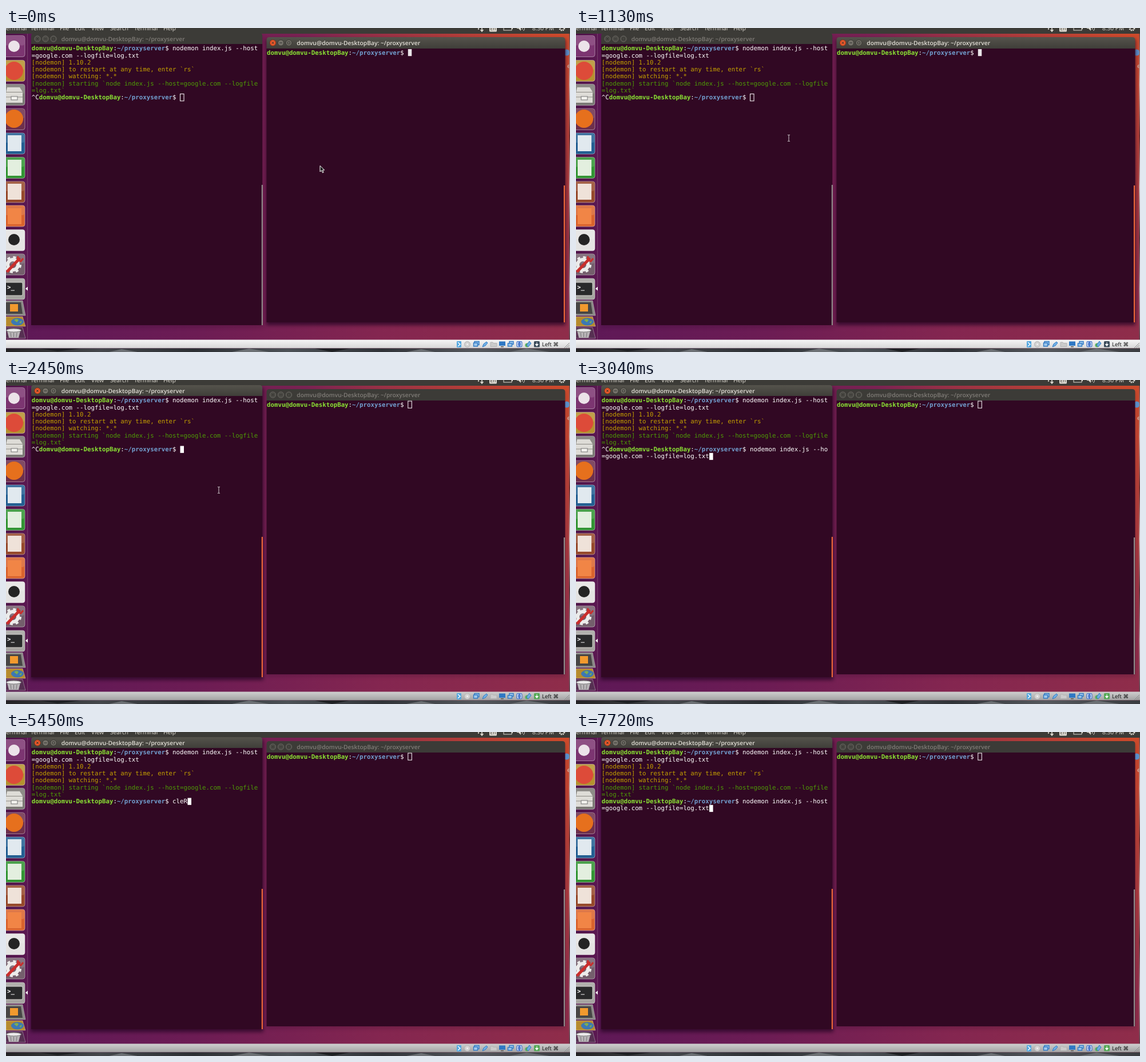
An HTML page for the animation above (8 s loop, 986x568 px).

```html
<!DOCTYPE html>
<html lang="en">
<head>
<meta charset="utf-8">
<title>Terminal session</title>
<style>
html, body { margin: 0; width: 100%; height: 100%; overflow: hidden; background: #333; }
svg { display: block; width: 986px; height: 568px; }
text { white-space: pre; text-rendering: geometricPrecision; font-family: "Open Sans", "DejaVu Sans", sans-serif; }
.mono { font: 10.78px "DejaVu Sans Mono", monospace; fill: #fff; }
.mono .user { fill: #8ae234; font-weight: bold; }
.mono .path { fill: #729fcf; font-weight: bold; }
.mono .warn { fill: #c4a000; }
.mono .ok { fill: #4e9a06; }
.menu { font-size: 10.2px; fill: #dfdbd2; }
.title { font-size: 10.3px; font-weight: 600; fill: #807d78; }
.active .title { fill: #e4e0d8; }
.bar { fill: #3c3b37; }
.active .bar { fill: url(#barOn); }
.btn { fill: #4b4a45; stroke: #67655f; }
.active .btn { fill: #75726a; stroke: #3a3934; }
.active .close { fill: #e9592b; stroke: #8a2f12; }
.glyph { fill: none; stroke: #33322e; }
.shadow { fill: #2a0626; filter: blur(3px); opacity: .2; }
.shadow.active { opacity: .8; }
</style>
</head>
<body>
<svg id="stage" viewBox="0 0 986 568"></svg>
<script>
const USER = 'domvu@domvu-DesktopBay', DIR = '~/proxyserver';
const CELL = 6.493, LINE = 12.25;
const ARGS = '=google.com --logfile=log.txt';

const rect = (x, y, w, h, fill, more = '') =>
  `<rect x="${x}" y="${y}" width="${w}" height="${h}" fill="${fill}" ${more}/>`;
const circle = (x, y, r, fill, more = '') => `<circle cx="${x}" cy="${y}" r="${r}" fill="${fill}" ${more}/>`;
const path = (d, fill, more = '') => `<path d="${d}" fill="${fill}" ${more}/>`;
const text = (x, y, cls, s, more = '') => `<text x="${x}" y="${y}" class="${cls}" ${more}>${s}</text>`;
const span = (cls, s) => `<tspan class="${cls}">${s}</tspan>`;
const gradient = (id, dir, ...colors) => `<linearGradient id="${id}" ${dir === 'v' ? 'x2="0" y2="1"' : ''}>` +
  colors.map((c, i) => `<stop offset="${i / (colors.length - 1)}" stop-color="${c}"/>`).join('') + '</linearGradient>';

const prompt = span('user', USER) + ':' + span('path', DIR) + '$ ';
const PROMPT_LEN = USER.length + DIR.length + 3;
const row = i => 39.4 + i * LINE;
const line = (i, s, id = '') => text(44.8, row(i), 'mono', s, id && `id="${id}"`);

function desktop() {
  return `<defs>
    ${gradient('wall', 'h', '#5d1857', '#6c1c54', '#842650', '#8f2d4a')}
    ${gradient('barOn', 'v', '#55534c', '#3f3e39')}
    ${gradient('light', 'v', '#f6f6f6', '#d6d6d6')}
    ${gradient('grey', 'v', '#cfcfcf', '#a2a2a2')}
    ${gradient('dock', 'h', '#4f1449', '#5b1851')}
    ${gradient('edge', 'v', '#6d4a48', '#c9c4c4', '#5b2a30', '#d5d2d2', '#4a3a40', '#b5b0b4', '#59404a')}
    ${gradient('rock', 'h', '#232224', '#44474b', '#2c2f33', '#4c5156', '#303338', '#55585d', '#3a3c40')}
    <radialGradient id="glow" gradientUnits="userSpaceOnUse" cx="986" cy="0" r="460">
      <stop offset="0" stop-color="#cf4b2a"/><stop offset="1" stop-color="#cf4b2a" stop-opacity="0"/>
    </radialGradient></defs>` +
    rect(0, 0, 986, 568, 'url(#wall)') + rect(0, 0, 986, 547, 'url(#glow)') +
    circle(980, 43, 5.5, '#5b93cf') + text(981, 70, 'menu', 'e') +
    rect(984.5, 10, 1.5, 537, 'url(#edge)');
}

function panel() {
  const items = [[0, 'erminal'], [43, 'Terminal'], [94, 'File'], [120, 'Edit'], [149, 'View'],
    [182, 'Search'], [224, 'Terminal'], [275, 'Help'], [920, '8:30 PM']];
  return rect(0, 0, 986, 10, '#3c3b37') + items.map(([x, s]) => text(x, 3.6, 'menu', s)).join('') +
    path('M826 0v3M832 0v5M829.5 3l2.5 3 2.5-3', 'none', 'stroke="#dfdbd2" stroke-width="1.6"') +
    rect(845, -4, 13, 10.5, '#dfdbd2', 'rx="1.5"') + text(846.5, 3.6, 'menu', 'En', 'style="fill:#3c3b37;font-size:8.5px"') +
    rect(870, -3, 14, 7, 'none', 'stroke="#dfdbd2"') + rect(884, -1, 2, 3, '#dfdbd2') +
    path('M893-2h3l4-4v11l-4-4h-3z', '#dfdbd2') +
    path('M902-2q2 2 0 5M904.5-4q4 4 0 9', 'none', 'stroke="#dfdbd2"') +
    circle(972, 0, 4, 'none', 'stroke="#dfdbd2" stroke-width="3" stroke-dasharray="2 1.1"');
}

// Launcher tile with its left edge off the stage
const tile = (y, fill, art) => rect(-5, y - 18, 38, 37, fill, 'rx="4" stroke="#ffffff66"') +
  rect(-4, y - 17, 36, 16, '#ffffff22', 'rx="3"') + art;
const square = (y, fill) => rect(3, y - 14, 24, 28, fill);
const folded = (y, h, fill) => path(`M0 ${y}h29l5 ${h}h-34z`, fill, 'stroke="#ffffff55"');

function dock() {
  return rect(0, 10, 37.5, 537, 'url(#dock)') + rect(37, 10, 1, 537, '#74406a') +
    tile(31.5, '#7c3571', circle(14, 32, 10, '#ece3e9')) +
    tile(74.5, '#b5912f', circle(14, 75, 16, '#dd4b39')) +
    tile(116.5, '#7b7975', path('M2 104h22l5 8v19h-29v-18z', '#dedcd7') +
      path('M0 112.5h29M0 121h29', 'none', 'stroke="#8b8984"') + rect(9, 120, 11, 6, '#f4f3ef', 'stroke="#777"')) +
    tile(159.5, '#6d2f4c', circle(14, 159, 16, '#e6701d')) +
    tile(202, '#235f92', square(202, '#e1e9ef')) +
    tile(244.5, '#329433', square(245, '#e3efdf')) +
    tile(287, '#96492b', square(287, '#efe2d9')) +
    tile(329, '#d9632d', square(330, '#f18546')) +
    tile(371.5, '#e4e3e2', circle(14, 371, 10, '#242424')) +
    tile(414, '#745e6c', circle(12, 415, 9, 'none', 'stroke="#ecebea" stroke-width="6"') +
      circle(12, 415, 13, 'none', 'stroke="#ecebea" stroke-width="4" stroke-dasharray="5 5.2"') +
      path('M3 426l20-21', 'none', 'stroke="#c92e2c" stroke-width="5" stroke-linecap="round"') +
      path('M21 400l-1 7 6 2 4-5', 'none', 'stroke="#c92e2c" stroke-width="3"')) +
    tile(457, '#a5a4a0', rect(-2, 446, 31, 23, '#292a2b', 'rx="2" stroke="#d4d3cf"') +
      text(2, 458, 'mono', '&gt;_', 'style="font-weight:bold"')) +
    path('M38 453.5v7l-4-3.5z', '#fff') +
    folded(478, 26, '#8b8986') + path('M0 481h26l3 20h-29z', '#474645') + rect(7, 484, 14, 13, '#f29a2e') +
    folded(506, 17, '#b68b2d') + '<ellipse cx="20" cy="515" rx="11" ry="6.5" fill="#3c78b4"/>' +
    path('M14 512q5-4 8 0l-3 4zM23 516l5-3-2 5z', '#7fae4d') +
    folded(525, 19, '#563052') + path('M2 531h23l-3 12h-17z', '#b8b4b7') +
    '<ellipse cx="13.5" cy="530" rx="13" ry="3" fill="#eceaeb" stroke="#777"/>' +
    path('M8 534l1 8M13.5 534v8M19 534l-1 8', 'none', 'stroke="#777"');
}

function win(id, x, y, right, bottom, top) {
  const w = right - x, cy = y + 10, button = (dx, cls) => circle(x + dx, cy, 5.2, '', `class="btn ${cls}"`);
  return `<g id="${id}">` + path(`M${x} ${top}v${5 + y - top}q0-5 5-5h${w - 10}q5 0 5 5v${top - y - 5}z`, '', 'class="bar"') +
    rect(x, top, w, bottom - top, '#310823') +
    button(11, 'close') + button(25, '') + button(39, '') +
    path(`M${x + 9} ${cy - 2}l4 4m0-4l-4 4M${x + 22.5} ${cy}h5M${x + 37} ${cy - 2}h4v4h-4z`, '', 'class="glyph"') +
    text(x + 52.8, cy + 3.6, 'title', `${USER}: ${DIR}`) + '</g>';
}

function statusBar() {
  const blue = '#2f78c4', screen = (x, y, w, h) => rect(x, y, w, h, '#9fc8ec', `stroke="${blue}" stroke-width="1.4"`);
  return rect(0, 546.5, 986, 15, 'url(#light)', 'id="status"') + rect(0, 561.5, 986, 6.5, 'url(#rock)') +
    path('M180 568l22-5 28 5zM395 568l30-6 35 6zM700 568l26-5 24 5zM880 568l30-6 40 6z', '#6c7074') +
    path('M60 562l30 5 40-5zM540 562l30 6 30-6z', '#1e2023') +
    rect(788, 549, 8, 11, '#53a7df', 'rx="1"') + path('M790 551l4 3.5-4 3.5', 'none', 'stroke="#fff" stroke-width="1.4"') +
    circle(806.5, 554.5, 5, '#d2d2d2', 'stroke="#b4b4b4"') + circle(806.5, 554.5, 1.5, '#f2f2f2') +
    screen(819, 549.5, 8, 6) + screen(817.5, 552, 7, 6) + rect(822, 554, 6, 6, '#58c552', 'id="lamp"') +
    path('M833 559l2-5 5-4 2 2-4 5z', '#73b2e6', `stroke="${blue}"`) +
    path('M847 551h4l1 1.5h6v6h-11z', '#cbcbcb', 'stroke="#b3b3b3"') +
    rect(862, 549.5, 11, 7.5, blue) + rect(865, 558, 5, 1.5, '#555') +
    screen(880, 549.5, 7, 5) + screen(877.5, 553, 7, 5) +
    rect(892.5, 549, 10, 10.5, '#527fd0', 'rx="2"') + path('M896 551h-1.5v6.5h1.5M899 551h1.5v6.5h-1.5', 'none', 'stroke="#fff"') +
    circle(911, 556, 3.5, '#58b157') + path('M910 556l5-7 3 4-5 6z', '#6faee0', `stroke="${blue}"`) +
    rect(923, 549, 10, 10.5, '#3b4b5a', 'rx="1.5" id="keys"') + path('M928 551v4M925.5 554.5h5l-2.5 3z', '#fff', 'stroke="#fff"') +
    text(937, 558, 'menu', 'Left ⌘', 'style="fill:#111;font-size:9.6px"') +
    path('M976 561l9-9M979.5 561l5.5-5.5M983 561l2-2', 'none', 'stroke="#888"');
}

const $ = id => document.getElementById(id);
$('stage').innerHTML = desktop() + dock() +
  rect(43, 14, 407, 512, '', 'class="shadow" id="leftShade"') +
  rect(455, 20, 523, 501, '', 'class="shadow" id="rightShade"') + panel() +
  win('left', 44, 9, 448.2, 521, 28) + win('right', 455.5, 16, 977.5, 516, 36) +
  line(0, prompt + 'nodemon index.js --host') + line(1, ARGS) +
  line(2, span('warn', '[nodemon] 1.10.2')) +
  line(3, span('warn', '[nodemon] to restart at any time, enter `rs`')) +
  line(4, span('warn', '[nodemon] watching: *.*')) +
  line(5, span('ok', '[nodemon] starting `node index.js --host=google.com --logfile')) +
  line(6, span('ok', '=log.txt`')) + line(7, '', 'input') + line(8, '', 'wrap') +
  text(456, 46.7, 'mono', prompt) +
  rect(0, 0, 6.5, 12.25, '#fff', 'id="caret"') + rect(702.8, 37, 6.5, 12.2, '#e9e5e8', 'id="caret2"') +
  rect(446.8, 275, 2.2, 246, '', 'id="scroll"') + rect(975, 276, 2.2, 240, '', 'id="scroll2"') +
  statusBar() +
  path('M.5.5v10.5l2.5-2.3 2 4.1 1.7-.8-1.9-4h3.4z', '#1c1c1c', 'stroke="#fff" id="arrow"') +
  path('M-2-5.5h1.500l.5.5.5-.5h1.500M0-5v10M-2 5.500h1.500l.5-.5.5.5h1.500', 'none', 'stroke="#d6d0d4" id="beam"');

const pointer = [[0, 548.5, 241, 'arrow'], [150, 546, 239.5, 'arrow'], [360, 447, 216.5, 'arrow'], [510, 402.5, 198.5, 'arrow'],
  [810, 364.5, 184, 'arrow'], [960, 364, 188, 'beam'], [1130, 372, 193, 'beam'], [2900, 0, 0, '']];
const typed = [[0, '', '^C'], [3040, 'nodemon index.js --ho', '^C', ARGS], [4530, 'clear'], [5450, 'cleR'],
  [6080, 'node -v'], [6970, 'cleR'], [7270, 'clear'], [7720, 'nodemon index.js --host', '', ARGS]];
const caretOff = [[1850, 2450], [3640, 4240], [4980, 5450], [6680, 6970]];

const at = (steps, t) => steps.findLast(s => s[0] <= t);
const set = (id, attrs) => { for (const k in attrs) $(id).setAttribute(k, attrs[k]); };
const caretBox = (id, solid) => set(id, solid ? { 'fill-opacity': 1, stroke: 'none' } : { 'fill-opacity': 0, stroke: '#fff' });

let shown;
function draw(now) {
  const t = now % 8000;
  const leftOn = t >= 1310;
  $('left').classList.toggle('active', leftOn);
  $('right').classList.toggle('active', !leftOn);
  $('leftShade').classList.toggle('active', leftOn);
  $('rightShade').classList.toggle('active', !leftOn);
  set('status', { fill: leftOn ? 'url(#grey)' : 'url(#light)' });
  set('keys', { fill: leftOn ? '#55a956' : '#3b4b5a' });
  set('scroll', { fill: leftOn ? '#ed6838' : '#8f8a89' });
  set('scroll2', { fill: t < 1490 ? '#ed6838' : '#8f8a89' });
  set('lamp', { visibility: t >= 660 && t < 810 ? 'visible' : 'hidden' });

  const step = at(typed, t);
  const [, cmd, prefix = '', tail = ''] = step;
  if (shown !== step) {
    shown = step;
    $('input').innerHTML = prefix + prompt + cmd;
    $('wrap').textContent = tail;
  }
  const col = tail ? tail.length : prefix.length + PROMPT_LEN + cmd.length;
  set('caret', {
    x: 44.8 + col * CELL, y: 115.6 + (tail ? LINE : 0),
    visibility: caretOff.some(([a, b]) => t >= a && t < b) ? 'hidden' : 'visible'
  });
  caretBox('caret', leftOn);
  caretBox('caret2', !leftOn);

  const [, x, y, shape] = at(pointer, t);
  for (const id of ['arrow', 'beam'])
    set(id, { transform: `translate(${x} ${y})`, visibility: id === shape ? 'visible' : 'hidden' });
}

const start = performance.now();
function tick() {
  draw(performance.now() - start);
  requestAnimationFrame(tick);
}
tick();
</script>
</body>
</html>
```
